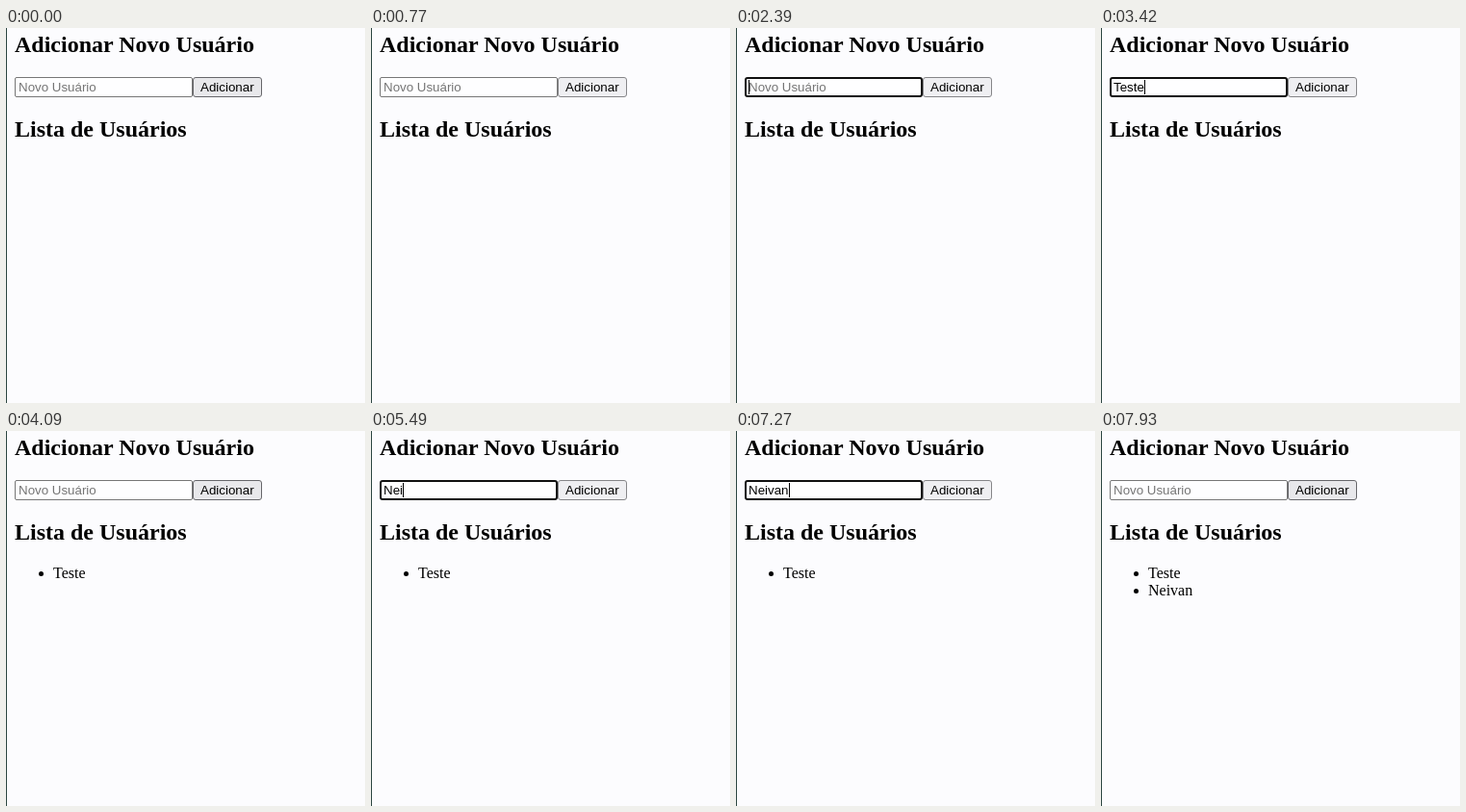
An HTML page for the animation above (8000 ms loop, 373 by 390 pixels).

```html
<!DOCTYPE html>
<html lang="pt-BR">
<head>
<meta charset="utf-8">
<title>Lista de Usuários</title>
<style>
  html, body { margin: 0; width: 100%; height: 100%; overflow: hidden; background: #fcfcfe; }
  #stage { position: relative; width: 373px; height: 390px; overflow: hidden; color: #000; }
  #stage * { position: absolute; box-sizing: border-box; margin: 0; white-space: pre; }
  #edge { left: 0; top: 0; width: 1px; height: 390px; background: #2c4642; }
  h2 { left: 9px; font: bold 24px/26px "Liberation Serif", "Times New Roman", serif; }
  #field, #button { top: 51px; height: 21px; font: 13.3333px/15px "Liberation Sans", Arial, sans-serif; }
  #field { left: 9px; width: 185px; border: 1px solid #767676; border-radius: 2px; background: #fefeff; }
  #field.focus { border: 2px solid #101010; border-radius: 3px; }
  #hint, #entry { left: 13px; top: 54px; height: 15px; font: 13.3333px/15px "Liberation Sans", Arial, sans-serif; }
  #hint { color: #757575; }
  #caret { top: 0; width: 1px; height: 15px; background: #000; }
  #stage #text { position: static; }
  #button { left: 194px; width: 72px; border: 1px solid #858588; border-radius: 3px; background: #efeff2; padding: 2px 0 0 7px; }
  #button.hover { border-color: #66666a; background: #e8e8eb; }
  .item { left: 49px; font: 16px/17px "Liberation Serif", "Times New Roman", serif; }
  .item::before { content: ""; position: absolute; left: -15.5px; top: 7px; width: 5px; height: 5px; border-radius: 50%; background: #000; }
</style>
</head>
<body>
<div id="stage">
  <div id="edge"></div>
  <h2 style="top:4px">Adicionar Novo Usuário</h2>
  <div id="field"></div>
  <div id="hint">Novo Usuário</div>
  <div id="entry"><span id="text"></span><i id="caret"></i></div>
  <div id="button">Adicionar</div>
  <h2 style="top:92px">Lista de Usuários</h2>
  <div class="item" style="top:139px">Teste</div>
  <div class="item" style="top:157px">Neivan</div>
</div>
<script>
const LOOP = 8000, BLINK = 500;

// Each row: start time in ms, value held until the next row
const focusSteps = [[0, false], [1170, true], [3890, false], [4840, true], [7900, false]];
const hoverSteps = [[0, true], [770, false], [3700, true], [4400, false], [7600, true]];
const countSteps = [[0, 0], [3910, 1], [7930, 2]];
const typed = (word, times) => times.map((t, i) => [t, word.slice(0, i + 1)]);
const textSteps = [
  [0, ""],
  ...typed("Teste", [3100, 3180, 3260, 3340, 3420]),
  [3910, ""],
  ...typed("Neivan", [5140, 5420, 5490, 5710, 5960, 6150]),
  [7930, ""]
];

const $ = id => document.getElementById(id);
const [field, hint, text, caret, button] = ["field", "hint", "text", "caret", "button"].map($);
const items = [...document.querySelectorAll(".item")];
const at = (steps, t) => steps.findLast(s => s[0] <= t);
const show = (el, on) => { el.style.visibility = on ? "visible" : "hidden"; };

function draw(t) {
  const [focusTime, focused] = at(focusSteps, t);
  const [textTime, value] = at(textSteps, t);
  const [, count] = at(countSteps, t);
  // Typing restarts the caret blink
  const lit = Math.floor((t - Math.max(focusTime, textTime)) / BLINK) % 2 === 0;

  field.classList.toggle("focus", focused);
  button.classList.toggle("hover", at(hoverSteps, t)[1]);
  if (text.textContent !== value) text.textContent = value;
  show(hint, !value);
  show(caret, focused && lit);
  items.forEach((el, i) => show(el, i < count));
}

const start = performance.now();
function tick() {
  draw((performance.now() - start) % LOOP);
  requestAnimationFrame(tick);
}
tick();
</script>
</body>
</html>
```
